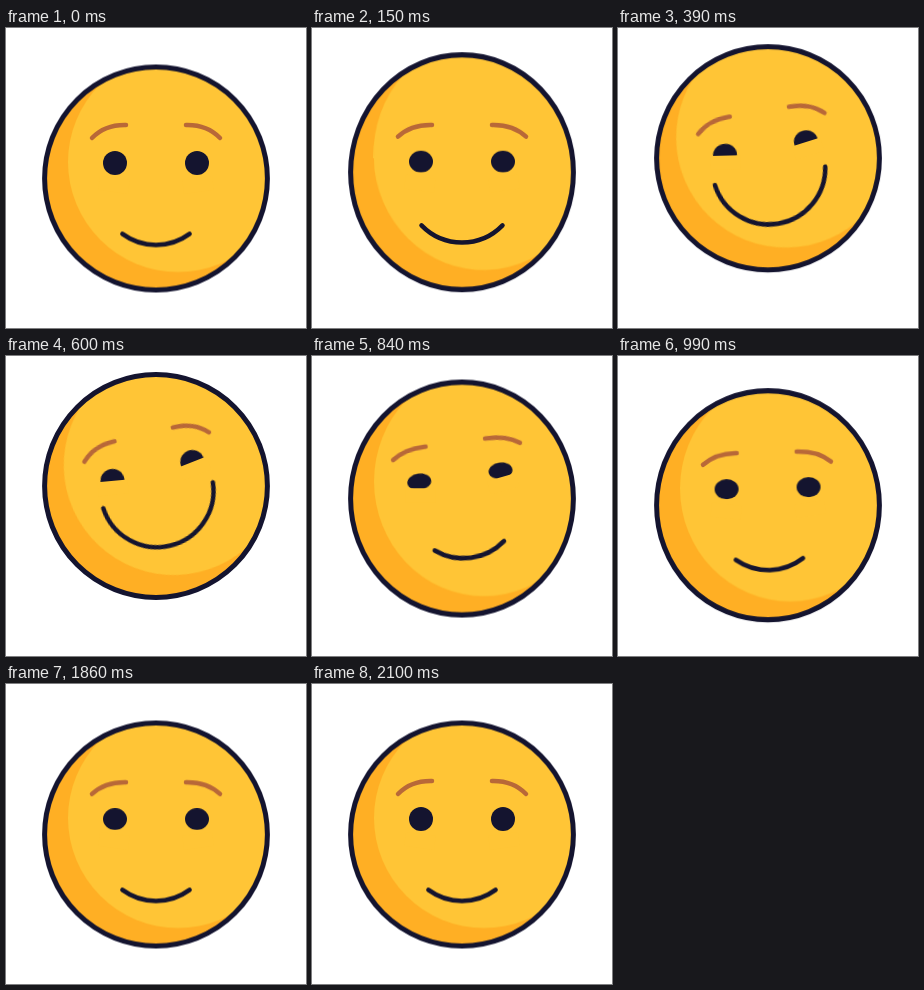
Animation of 300x300 px, one loop 5150 ms. Source, as an HTML page:

```html
<!DOCTYPE html>
<html lang="en">
<head>
<meta charset="utf-8">
<title>Smile</title>
<style>
  :root { --ink: #14142f; --skin: #ffc536; --shade: #ffaf24; --brow: #b86838; }
  html, body { margin: 0; width: 100%; height: 100%; overflow: hidden; background: #fff; }
  svg { display: block; width: 100%; height: 100%; }

  .head, .light, .face, .squash, .cheek, .mouth {
    animation: 5150ms ease-in-out infinite both;
    transform-origin: 0 0;
  }
  .head { animation-name: hop; }
  .light { animation-name: roll; }
  .face { animation-name: tilt; }
  .squash { animation-name: squash; }
  .cheek { animation-name: cheek; }
  .mouth { animation-name: smile; }

  .line { fill: none; stroke: var(--ink); stroke-width: 4.5; stroke-linecap: round; }
  .outline { stroke-width: 5; }
  .brow { stroke: var(--brow); vector-effect: non-scaling-stroke; }
  .eye { fill: var(--ink); }
  .skin { fill: var(--skin); }

  @keyframes hop {
    0% { transform: translateY(0) scaleY(1); animation-timing-function: ease-in; }
    2.14% { transform: translateY(-3px) scaleY(1.066); animation-timing-function: linear; }
    4.66% { transform: translateY(-13.3px) scaleY(1.025); animation-timing-function: ease-out; }
    8.16%, 12.04% { transform: translateY(-20.5px) scaleY(1); animation-timing-function: ease-in; }
    16.31% { transform: translateY(-8px) scaleY(1.044); animation-timing-function: linear; }
    17.67% { transform: translateY(-3px) scaleY(1.07); animation-timing-function: ease-out; }
    20.97% { transform: translateY(-.3px) scaleY(1.006); }
    23.88%, 100% { transform: translateY(0) scaleY(1); }
  }
  @keyframes roll {
    0% { transform: rotate(0deg); animation-timing-function: ease-in; }
    4.66% { transform: rotate(-4deg); animation-timing-function: ease-out; }
    8.74%, 12.04% { transform: rotate(-13deg); }
    16.31%, 100% { transform: rotate(0deg); }
  }
  @keyframes tilt {
    0% { transform: translateY(0) rotate(0deg); animation-timing-function: ease-in; }
    4.66% { transform: translateY(-3px) rotate(0deg); }
    9.32%, 13.2% { transform: translateY(-20px) rotate(-13.3deg); animation-timing-function: ease-in; }
    16.31% { transform: translateY(-15px) rotate(-7.8deg); animation-timing-function: ease-out; }
    20.97%, 100% { transform: translateY(0) rotate(0deg); }
  }
  @keyframes squash {
    0%, 1.75% { transform: scaleY(1); animation-timing-function: ease-in; }
    4.66% { transform: scaleY(.57); animation-timing-function: ease-out; }
    5.83% { transform: scaleY(.3); }
    8.16%, 13.98% { transform: scaleY(1); animation-timing-function: ease-in; }
    16.31% { transform: scaleY(.69); animation-timing-function: ease-out; }
    17.48% { transform: scaleY(.5); }
    20.39%, 35.53% { transform: scaleY(1); }
    38.16% { transform: scaleY(.12); }
    40.78%, 100% { transform: scaleY(1); }
  }
  @keyframes cheek {
    0%, 4.66% { transform: translateY(15px); }
    8.16%, 13.2% { transform: translateY(0); }
    16.31% { transform: translateY(6.5px); }
    18.6%, 100% { transform: translateY(15px); }
  }
  /* The mouth is a trimmed half circle, 180 units long. */
  @keyframes smile {
    0% { transform: translateY(10px); stroke-dasharray: 73 360; stroke-dashoffset: -53.5; animation-timing-function: ease-in; }
    4.66% { transform: translateY(7.5px); stroke-dasharray: 113 360; stroke-dashoffset: -33.5; animation-timing-function: ease-out; }
    8.74%, 12.43% { transform: translateY(4.3px); stroke-dasharray: 170 360; stroke-dashoffset: -5; }
    16.31% { transform: translateY(10.3px); stroke-dasharray: 76.6 360; stroke-dashoffset: -51.7; animation-timing-function: ease-out; }
    18.06%, 100% { transform: translateY(10px); stroke-dasharray: 73 360; stroke-dashoffset: -53.5; }
  }
</style>
</head>
<body>
<svg viewBox="0 0 300 300">
  <clipPath id="disc"><circle r="111.4"/></clipPath>
  <g transform="translate(150 150.5)">
    <g class="head">
      <circle r="111.4" fill="var(--shade)"/>
      <g clip-path="url(#disc)">
        <g class="light"><circle class="skin" cx="22" cy="-16.5" r="110"/></g>
      </g>
      <circle class="line outline" r="111.4"/>
    </g>
    <g class="face">
      <g transform="translate(-41 -15.5)">
        <g class="squash"><circle class="eye" r="12"/></g>
        <g class="cheek"><rect class="skin" x="-15" width="30" height="14" transform="rotate(8)"/></g>
      </g>
      <g transform="translate(41 -15.5)">
        <g class="squash"><circle class="eye" r="12"/></g>
        <g class="cheek"><rect class="skin" x="-15" width="30" height="14" transform="rotate(-8)"/></g>
      </g>
      <g transform="translate(0 -40.5)">
        <g class="squash">
          <path class="line brow" d="M-64 0Q-51 -13.5 -30 -13"/>
          <path class="line brow" d="M64 0Q51 -13.5 30 -13"/>
        </g>
      </g>
      <path class="line mouth" d="M-56.5 0A56.5 56.5 0 0 0 56.5 0" pathLength="180"/>
    </g>
  </g>
</svg>
</body>
</html>
```
